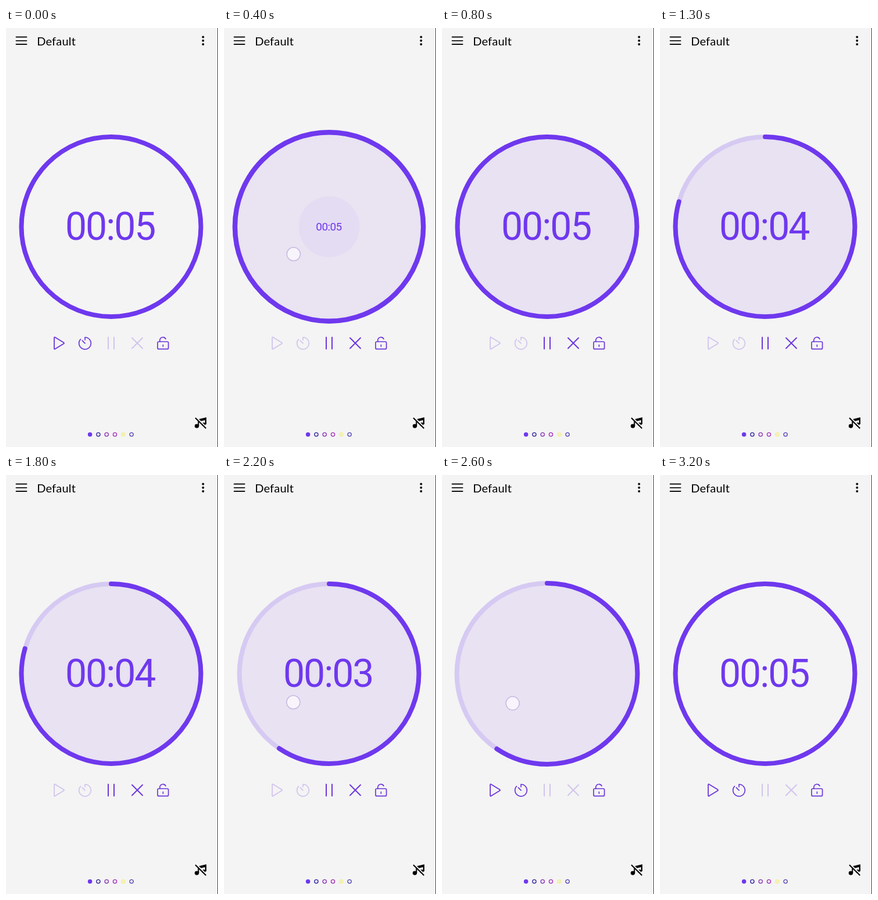
An HTML page for the animation above (3300 ms loop, 365 px wide and 720 px high).

```html
<!DOCTYPE html>
<html lang="en">
<head>
<meta charset="utf-8">
<title>Countdown timer</title>
<style>
  html, body { margin: 0; width: 100%; height: 100%; overflow: hidden; background: #f4f4f4; }
  svg { display: block; width: 365px; height: 720px; }
  .line { fill: none; stroke-linecap: round; stroke-linejoin: round; stroke-width: 2; }
  .buttons { stroke: #6b35dc; }
  .title { font: 20px Lato, sans-serif; letter-spacing: .2px; }
  .clock { font: 66px Roboto, sans-serif; letter-spacing: -2px; fill: #6f38ee; }
</style>
</head>
<body>
<svg viewBox="0 0 365 720">
  <rect width="365" height="720" fill="#f4f4f4"/>
  <rect x="364" width="1" height="720" fill="#444"/>

  <path class="line" stroke="#111" style="stroke-width:1.8" d="M17.5 15.5H35.5M17.5 21.8H35.5M17.5 28H35.5"/>
  <text class="title" x="53.2" y="30">Default</text>
  <g fill="#111">
    <circle cx="339.3" cy="15.5" r="2"/>
    <circle cx="339.3" cy="21.8" r="2"/>
    <circle cx="339.3" cy="28" r="2"/>
  </g>

  <g transform="translate(181 341.5)">
    <g id="dial">
      <circle id="fill" r="154.5" fill="#e8e2f2"/>
      <circle id="ripple" fill="#e4dcf3"/>
      <circle id="track" r="154.5" fill="none" stroke="#d6caf3" stroke-width="8"/>
      <circle id="arc" r="154.5" fill="none" stroke="#6f38ee" stroke-width="8"
        stroke-linecap="round" pathLength="1" transform="rotate(-90)"/>
    </g>
    <g id="digits"><text id="clock" class="clock" x="-79" y="22.7">00:05</text></g>
  </g>

  <g class="line buttons">
    <g id="idle">
      <path d="M83 532.2V550.8Q83 552.4 84.5 551.6L99.3 542.6Q100.6 541.5 99.3 540.5L84.5 531.5Q83 530.7 83 532.2Z" style="stroke-width:1.8"/>
      <path d="M136 536V531.5A10.3 10.3 0 1 1 128.4 534.8M131.3 537.2L136 541.8" style="stroke-width:1.7"/>
    </g>
    <g id="busy">
      <path d="M176 531.5V551.5M186 531.5V551.5"/>
      <path d="M217 532.5L235 550.5M235 532.5L217 550.5"/>
    </g>
    <rect x="261" y="539" width="18.6" height="12.7" rx="2" style="stroke-width:1.7"/>
    <path d="M264.8 539V536.5A5.4 5.4 0 0 1 275 534.3M270.4 544.5V547.3" style="stroke-width:1.7"/>
  </g>

  <g>
    <ellipse cx="328.5" cy="684" rx="3.7" ry="3.4"/>
    <ellipse cx="340.3" cy="681" rx="3.2" ry="2.9"/>
    <path d="M330.3 672.6L345 669V681H342.7V673.8L332.3 676.4V684H330.3Z"/>
    <path d="M327.5 669L346 687" stroke="#f4f4f4" stroke-width="2"/>
    <path d="M326 670L344.3 688" stroke="#000" stroke-width="2"/>
  </g>

  <g id="pages" stroke-width="1.3"></g>
  <circle id="touch" r="11.5" fill="#f8f4fc" stroke="#c5b8e0" stroke-width="1.5"/>
</svg>

<script>
const LOOP = 3300, STEP = 100, MOVE = 500;
const START = 220, RESET = 2570;
const TICKS = [[0, 5, 1], [1200, 4, .795], [2150, 3, .594]];

const el = id => document.getElementById(id);
const clamp = v => Math.max(0, Math.min(1, v));
const ramp = (t, from, to) => clamp((t - from) / (to - from));
const ease = k => (1 - Math.cos(Math.PI * k)) / 2;
const set = (id, attrs) => {
  for (const name in attrs) el(id).setAttribute(name, attrs[name]);
};

const pages = ['#6f38ee', '#2f20a0', '#8a2fb4', '#a52bb8', '#f3ee9c', '#5347b5'];
el('pages').innerHTML = pages.map((color, i) => {
  const solid = i === 0 || i === 4;
  return `<circle cx="${144.6 + i * 14.3}" cy="698.5" r="3.1" stroke="${color}"
    fill="${solid ? color : 'none'}" fill-opacity="${i ? .6 : 1}"/>`;
}).join('');

function drawTouch(t) {
  const second = t > 1500;
  const shift = ramp(t, 2200, 2600);
  const x = second ? 119.3 + 2.3 * shift : 119.8;
  const y = second ? 390.5 + 1.8 * shift : 388.5;
  const alpha = second
    ? ramp(t, 2050, 2150) * (1 - ramp(t, 2700, 2900))
    : ramp(t, 50, 150) * (1 - ramp(t, 400, 560));
  set('touch', { cx: x, cy: y, opacity: alpha });
}

function draw(t) {
  const running = t >= START && t < RESET;
  const reset = t >= RESET;
  const k = ramp(t, reset ? RESET : START, (reset ? RESET : START) + MOVE);
  const moving = t >= START && k < 1;

  const [, seconds, left] = TICKS.filter(tick => t >= tick[0]).pop();
  const part = reset ? left + (1 - left) * k ** 3 : left;
  const bump = moving ? 1 + (reset ? .034 : .055) * Math.sin(Math.PI * k) : 1;
  const size = moving ? ease(k) : 1;

  set('dial', { transform: `scale(${bump})` });
  set('fill', { opacity: ramp(t, START, START + 200) * (1 - ramp(t, 2600, 3000)) });
  set('track', { opacity: t >= START ? 1 : 0 });
  set('arc', { 'stroke-dasharray': part < 1 ? `${part} 2` : 'none' });
  set('ripple', {
    r: k * 138,
    opacity: moving && !reset ? 1 - ramp(k, .6, 1) : 0
  });

  set('digits', {
    transform: `scale(${size})`,
    visibility: size < .02 ? 'hidden' : 'visible'
  });
  el('clock').textContent = '00:0' + (reset ? 5 : seconds);

  set('idle', { opacity: running ? .25 : 1 });
  set('busy', { opacity: running ? 1 : .25 });
  drawTouch(t);
}

const origin = performance.now();
function frame() {
  const t = (performance.now() - origin) % LOOP;
  draw(Math.floor(t / STEP) * STEP);
  requestAnimationFrame(frame);
}
frame();
</script>
</body>
</html>
```
